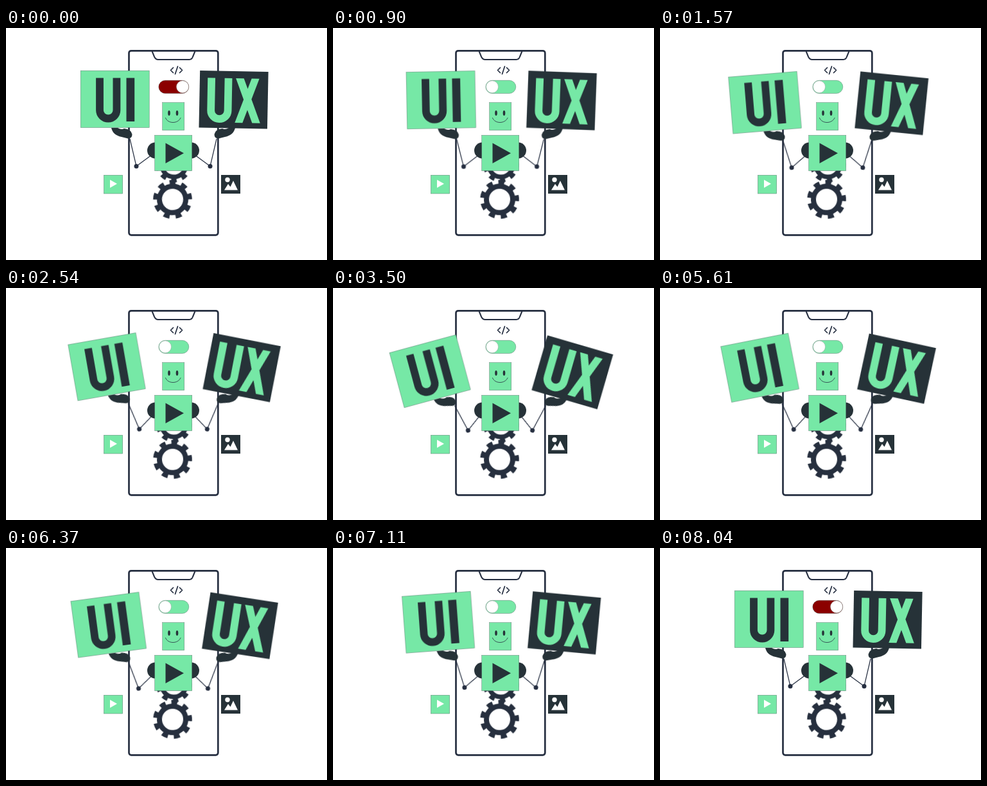
An HTML page that plays this animation: 500x360 px, repeating every 8.27 s.

```html
<!DOCTYPE html>
<html lang="en">
<head>
<meta charset="utf-8">
<title>UI / UX</title>
<style>
  :root { --green: #76e8a6; --dark: #263238; --line: #252e40; --red: #8b0000; --loop: 8270ms linear infinite; }
  html, body { margin: 0; width: 100%; height: 100%; overflow: hidden; background: #fff; }
  svg { display: block; width: 100vw; height: 100vh; }

  .green { fill: var(--green); }
  .dark { fill: var(--dark); }
  .card { stroke: #4d6660; stroke-width: .6; stroke-opacity: .7; }
  .thin { fill: none; stroke: var(--line); stroke-width: 1.2; stroke-linecap: round; stroke-linejoin: round; }
  .outline { fill: none; stroke: var(--line); stroke-width: 2.7; stroke-linejoin: round; }
  .notch { stroke-width: 2; }
  .code { stroke-width: 1.7; }
  .smile { stroke-width: .8; }
  .bowl { fill: none; stroke-width: 11.8; }
  .teeth { stroke-dasharray: 1 1; stroke-dashoffset: .5; }
  .gear { fill: none; stroke: #262f3e; }

  /* Each arm swings rigidly with its sign around the shoulder. */
  .arm { animation: swing var(--loop); }
  .left { --swing: -18.2deg; transform-origin: 231px 190px; }
  .right { --swing: 18.2deg; transform-origin: 290px 190px; }
  @keyframes swing {
    0%, 8.46%, 97.22%, 100% { transform: rotate(0deg); }
    49.21% { transform: rotate(var(--swing)); }
  }

  .track { animation: track var(--loop); }
  @keyframes track {
    0%, 97.22%, 100% { fill: var(--red); }
    8.46%, 89.5% { fill: var(--green); }
  }
  .knob { animation: knob var(--loop); }
  @keyframes knob {
    0%, 97.22%, 100% { transform: translateX(27px); }
    8.46%, 89.5% { transform: translateX(0); }
  }

  .turn { animation: turn var(--loop); }
  .big { --rest: -10deg; --turned: -4deg; transform-origin: 259.5px 266px; }
  .small { --rest: 10deg; --turned: 4deg; transform-origin: 261.5px 212px; }
  @keyframes turn {
    0%, 97.22%, 100% { transform: rotate(var(--rest)); }
    8.46%, 89.5% { transform: rotate(var(--turned)); }
  }
</style>
</head>
<body>
<svg viewBox="0 0 500 360">
  <defs>
    <g id="limb">
      <path class="thin" d="M231 194L203 214.500L193 172"/>
      <circle cx="203" cy="214.500" r="3.500" fill="#252e40"/>
      <path class="dark" d="M164 155C166 163 171 167 180 169L190 171.500Q196.500 171.500 196.500 165Q195 157 184 156Q180 158.500 174 155Z"/>
    </g>
  </defs>

  <!-- phone -->
  <rect class="outline" x="191.500" y="35.300" width="138.800" height="286" rx="3.500"/>
  <path class="outline notch" d="M227.500 36L231 44.500Q233 49 237 49H285.500Q289.500 49 291 44.500L294.500 36"/>
  <path class="thin code" d="M260.500 61.500L256.500 65.500L260.500 69.500M267.500 59.500L263.500 71.500M270.500 61.500L274.500 65.500L270.500 69.500"/>

  <!-- toggle -->
  <rect class="track card" x="237.800" y="81.300" width="47" height="20.200" rx="10.100"/>
  <circle class="knob" cx="248" cy="91.300" r="9.500" fill="#fff" stroke="#8a9a94" stroke-width=".5"/>

  <!-- smiling card -->
  <rect class="green card" x="243.700" y="115.700" width="34" height="43"/>
  <ellipse class="dark" cx="254" cy="132" rx="1.800" ry="4"/>
  <ellipse class="dark" cx="266.500" cy="132" rx="1.800" ry="4"/>
  <path class="thin smile" d="M248.500 139.500C252 149 268 149 272 139.500"/>

  <!-- gears -->
  <g class="gear turn small">
    <circle cx="261.500" cy="212" r="19" stroke-width="7"/>
    <circle class="teeth" cx="261.500" cy="212" r="24.500" stroke-width="6.500" pathLength="18"/>
  </g>
  <g class="gear turn big">
    <circle cx="259.500" cy="266" r="20.500" stroke-width="8"/>
    <circle class="teeth" cx="259.500" cy="266" r="27" stroke-width="6.600" pathLength="18"/>
  </g>

  <!-- side icons -->
  <rect class="green card" x="152.400" y="228.300" width="29.300" height="28.700"/>
  <path d="M162 235.500V248L173 241.800Z" fill="#fff"/>
  <rect class="dark" x="335" y="228" width="30" height="29"/>
  <circle cx="345" cy="235.500" r="3.700" fill="#fff"/>
  <path d="M340 251.500L346 242L349.500 246.500L354 237L361 251.500Z" fill="#fff"/>

  <!-- arms with signs -->
  <g class="arm left">
    <use href="#limb"/>
    <g role="img" aria-label="UI">
      <rect class="green card" x="116.200" y="66.200" width="107" height="88.300"/>
      <path class="bowl" stroke="#263238" d="M146 77.500V127.500a13.200 13 0 0 0 26.400 0V77.500"/>
      <rect class="dark" x="187.500" y="77.500" width="12.700" height="67.500"/>
    </g>
  </g>
  <g class="arm right">
    <use href="#limb" transform="matrix(-1 0 0 1 521 0)"/>
    <g role="img" aria-label="UX" transform="rotate(1.100 354.500 111.300)">
      <rect class="dark" x="301.300" y="67" width="106.500" height="88.500"/>
      <path class="bowl" stroke="#76e8a6" d="M319.500 78V128.500a13.200 13 0 0 0 26.400 0V78"/>
      <path class="green" d="M357.500 78h12.500l26.500 69h-12.500zM382 78h12l-25 69h-12z"/>
    </g>
  </g>

  <!-- shoulders and play card -->
  <circle class="dark" cx="232.500" cy="190" r="12.500"/>
  <circle class="dark" cx="288.500" cy="190" r="12.500"/>
  <rect class="green card" x="231.700" y="166.500" width="58" height="55"/>
  <path class="dark" d="M248.500 178.500V210L277 194.200Z"/>
</svg>
</body>
</html>
```
